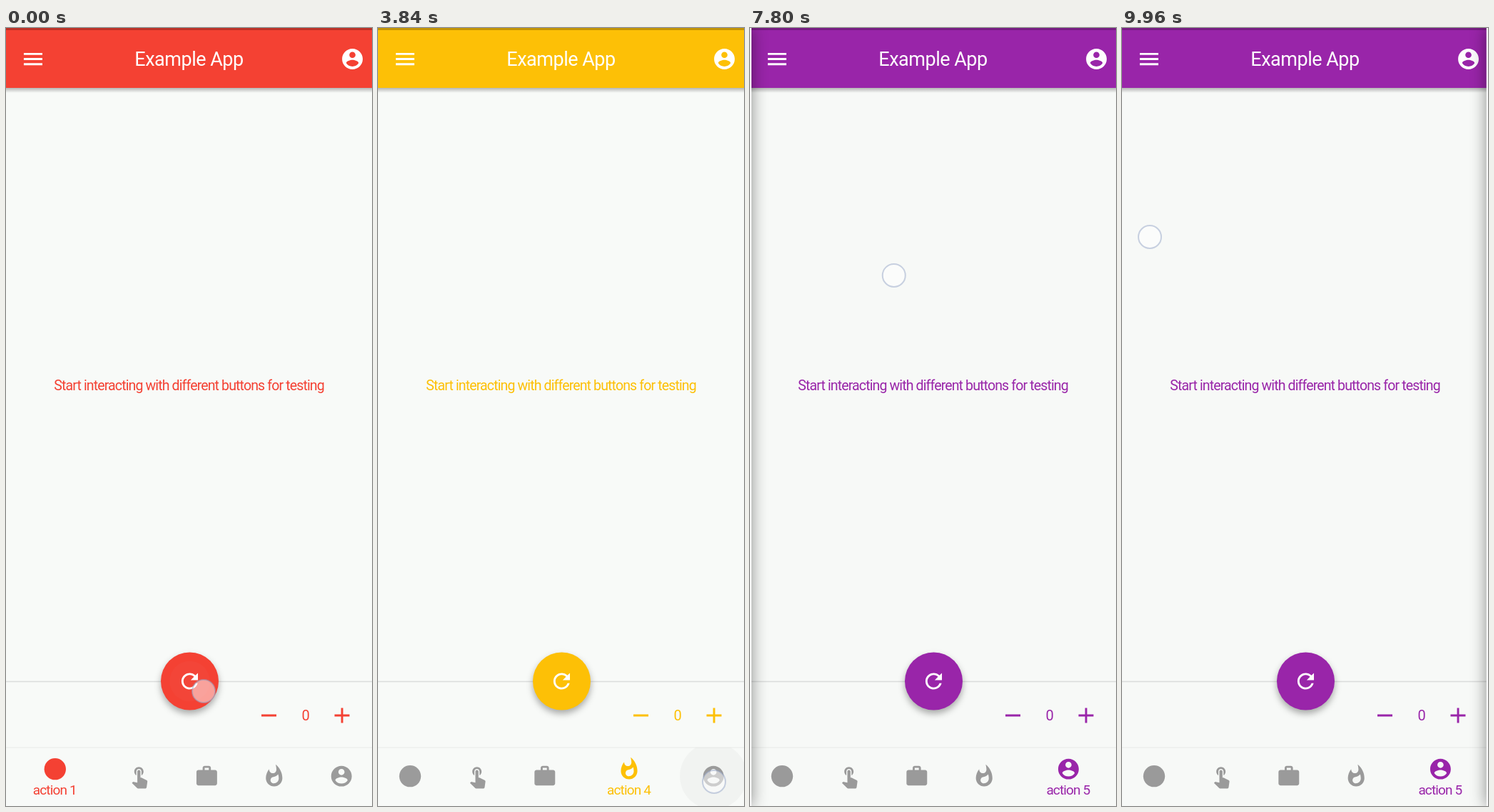
Write an HTML page that moves like this. It is 513x1091 px and loops after 10 s.

```html
<!DOCTYPE html>
<html lang="en">
<head>
<meta charset="utf-8">
<title>Example App</title>
<style>
html, body { margin: 0; width: 100%; height: 100%; overflow: hidden; background: #f8faf8; }
svg { display: block; width: 100%; height: 100%; --theme: #f44133; }
text { font-family: Roboto, "Liberation Sans", sans-serif; text-anchor: middle; }
.theme { fill: var(--theme); }
.title { font-size: 27px; letter-spacing: -.5px; fill: #fff; }
.hint { font-size: 19.5px; letter-spacing: -.86px; }
.label { font-size: 19px; letter-spacing: -.85px; }
#fab { filter: drop-shadow(0 5px 5px rgba(0, 0, 0, .32)); }
#left, #right { fill: #fafafa; filter: drop-shadow(0 0 11px rgba(0, 0, 0, .45)); }
</style>
</head>
<body>
<svg id="stage" viewBox="0 0 513 1091">
  <defs>
    <linearGradient id="under" x2="0" y2="1">
      <stop stop-color="#000" stop-opacity=".27"/>
      <stop offset="1" stop-color="#000" stop-opacity="0"/>
    </linearGradient>
    <clipPath id="fabClip"><circle cx="257.5" cy="916" r="40.5"/></clipPath>
    <clipPath id="navClip"><rect y="1009" width="513" height="82"/></clipPath>
    <path id="menu" d="M3 18h18v-2H3v2zm0-5h18v-2H3v2zm0-7v2h18V6H3z"/>
    <path id="user" d="M12 2C6.48 2 2 6.48 2 12s4.48 10 10 10 10-4.48 10-10S17.52 2 12 2zm0 3c1.66 0 3 1.34 3 3s-1.34 3-3 3-3-1.34-3-3 1.34-3 3-3zm0 14.2c-2.5 0-4.71-1.28-6-3.22.03-1.99 4-3.08 6-3.08 1.99 0 5.97 1.09 6 3.08-1.29 1.94-3.5 3.22-6 3.22z"/>
    <path id="refresh" d="M17.65 6.35A7.958 7.958 0 0 0 12 4c-4.42 0-7.99 3.58-7.99 8s3.57 8 7.99 8c3.73 0 6.84-2.55 7.73-6h-2.08A5.99 5.99 0 0 1 12 18c-3.31 0-6-2.69-6-6s2.69-6 6-6c1.66 0 3.14.69 4.22 1.78L13 11h7V4z"/>
    <circle id="dotIcon" cx="12" cy="12" r="10.5"/>
    <path id="hand" d="M9 11.24V7.5C9 6.12 10.12 5 11.5 5S14 6.12 14 7.5v3.74c1.21-.81 2-2.18 2-3.74C16 5.01 13.99 3 11.5 3S7 5.01 7 7.5c0 1.56.79 2.93 2 3.74zm9.84 4.63l-4.54-2.26c-.17-.07-.35-.11-.54-.11H13v-6c0-.83-.67-1.5-1.5-1.5S10 6.67 10 7.5v10.74l-3.43-.72c-.08-.01-.15-.03-.24-.03-.31 0-.59.13-.79.33l-.79.8 4.94 4.94c.27.27.65.44 1.06.44h6.79c.75 0 1.33-.55 1.44-1.28l.75-5.27c.01-.07.02-.14.02-.2 0-.62-.38-1.16-.91-1.38z"/>
    <path id="case" d="M20 6h-4V4c0-1.11-.89-2-2-2h-4c-1.11 0-2 .89-2 2v2H4c-1.11 0-1.99.89-1.99 2L2 19c0 1.11.89 2 2 2h16c1.11 0 2-.89 2-2V8c0-1.11-.89-2-2-2zm-6 0h-4V4h4v2z"/>
    <path id="flame" d="M13.5.67s.74 2.65.74 4.8c0 2.06-1.35 3.73-3.41 3.73-2.07 0-3.63-1.67-3.63-3.73l.03-.36C5.21 7.51 4 10.62 4 14c0 4.42 3.58 8 8 8s8-3.58 8-8C20 8.61 17.41 3.8 13.5.67zM11.71 19c-1.78 0-3.22-1.4-3.22-3.14 0-1.62 1.05-2.76 2.81-3.12 1.77-.36 3.6-1.21 4.62-2.58.39 1.29.59 2.65.59 4.04 0 2.65-2.15 4.8-4.8 4.8z"/>
  </defs>

  <rect width="513" height="1091" fill="#f8faf8"/>
  <text class="theme hint" x="256.5" y="507.5">Start interacting with different buttons for testing</text>

  <rect y="84" width="513" height="7" fill="url(#under)"/>
  <rect class="theme" width="513" height="84"/>
  <rect width="513" height="3" fill="#000" opacity=".23"/>
  <text class="title" x="256.5" y="53">Example App</text>
  <g fill="#fff">
    <use href="#menu" transform="translate(20.6 26.2) scale(1.446)"/>
    <use href="#user" transform="translate(468.2 26.2) scale(1.446)"/>
  </g>

  <rect y="915.7" width="513" height="1.6" fill="#dcdedd"/>
  <g id="stepRipples"></g>
  <path class="theme" d="M358 962.6h21v2.9h-21zM460.5 962.6h21v2.9h-21zM469.6 953.6h2.9v21h-2.9z"/>
  <text class="theme" id="count" x="420" y="971" font-size="20">0</text>

  <circle class="theme" id="fab" cx="257.5" cy="916" r="40.5"/>
  <g id="fabRipples" clip-path="url(#fabClip)"></g>
  <use href="#refresh" fill="#fff" transform="translate(240.1 898.6) scale(1.446)"/>

  <rect y="1008" width="513" height="2" fill="#f0f2f0"/>
  <rect y="1010" width="513" height="81" fill="#f8faf8"/>
  <g id="navRipples" clip-path="url(#navClip)"></g>
  <g id="tabs"></g>

  <rect id="scrim" width="513" height="1091"/>
  <rect id="left" x="-440" width="440" height="1091"/>
  <rect id="right" x="513" width="440" height="1091"/>
  <circle id="finger" r="16" fill="#fff" fill-opacity=".5" stroke="#96a5c8" stroke-opacity=".5" stroke-width="2"/>
</svg>
<script>
const LOOP = 10000, FADE = 200, GREY = '#9b9b9b', START = '#f44133';
const $ = id => document.getElementById(id);

// release time, control, theme colour afterwards
const taps = [
  [100, 'fab', '#2196f3'], [1440, 'fab', '#00bcd4'], [1700, 'fab', '#4caf50'], [1940, 'fab', '#3f51b5'],
  [2440, 'tab2', '#e91e63'], [2900, 'tab3', '#009688'], [3480, 'tab4', '#fdc006'], [3900, 'tab5', '#ff5722'],
  [4680, '+', '#8bc34a'], [4800, '+', '#03a9f4'], [4960, '+', '#cddc39'], [5120, '+', '#795548'],
  [5280, '+', '#f44133'], [5440, '+', '#ff9800'], [5680, '+', '#607d8b'],
  [6340, '-', '#4caf50'], [6480, '-', '#e91e63'], [6640, '-', '#00bcd4'], [6800, '-', '#ff5722'],
  [6960, '-', '#673ab7'], [7120, '-', '#2196f3'], [7320, '-', '#9a25aa']
].map(([up, on, color]) => ({ up, on, color, down: up - (on === 'fab' || on.startsWith('tab') ? 110 : 90) }));

// ripple centre, touch point, layer, reach, tint
const spots = {
  fab: [257.5, 916, 277, 930, 'fabRipples', 42, 'rgba(205,205,205,.18)'],
  '+': [471, 963, 497, 981, 'stepRipples', 49.5, 'rgba(0,0,0,.05)'],
  '-': [368.5, 963, 362, 972, 'stepRipples', 49.5, 'rgba(0,0,0,.05)']
};
[187.5, 281, 375.5, 470].forEach((x, i) => {
  spots['tab' + (i + 2)] = [x, 1049, x + 1, 1057, 'navRipples', 50, 'rgba(0,0,0,.04)'];
});

const drags = [
  { down: 7720, up: 7860, from: [60, 351], to: [305, 344] },
  { down: 9880, up: LOOP, from: [39, 293], to: [39, 293] }
];
const touches = taps.map(({ down, up, on }) => {
  const p = spots[on].slice(2, 4);
  return { down, up, from: p, to: p };
}).concat(drags);

const clamp = v => Math.max(0, Math.min(1, v));
const lerp = (a, b, k) => a + (b - a) * k;
const ease = k => k < .5 ? 2 * k * k : 1 - 2 * (1 - k) ** 2;
const ramp = (t, a, b) => ease(clamp((t - a) / (b - a)));
const rgb = hex => [1, 3, 5].map(i => parseInt(hex.slice(i, i + 2), 16));
const mix = (a, b, k) => a.map((v, i) => lerp(v, b[i], k));
const css = c => `rgb(${c.map(Math.round)})`;

function make(tag, attrs, parent) {
  const el = document.createElementNS('http://www.w3.org/2000/svg', tag);
  for (const key in attrs) el.setAttribute(key, attrs[key]);
  return parent.appendChild(el);
}

for (const tap of taps) {
  const [cx, cy, , , layer, reach, fill] = spots[tap.on];
  tap.reach = reach;
  tap.ripple = make('circle', { cx, cy, fill }, $(layer));
}

const tabs = ['dotIcon', 'hand', 'case', 'flame', 'user'].map((name, i) => {
  const icon = make('use', { href: '#' + name }, $('tabs'));
  const label = make('text', { class: 'theme label', y: 1075 }, $('tabs'));
  label.textContent = 'action ' + (i + 1);
  return { icon, label };
});

function themeAt(t) {
  let color = rgb(START);
  taps.forEach((tap, i) => {
    if (t < tap.up) return;
    const end = i + 1 < taps.length ? Math.min(t, taps[i + 1].up) : t;
    color = mix(color, rgb(tap.color), clamp((end - tap.up) / FADE));
  });
  return color;
}

function drawTabs(t, theme) {
  let weights = [1, 0, 0, 0, 0];
  for (const { up, on } of taps) {
    if (!on.startsWith('tab') || t < up) continue;
    const k = ramp(t, up, up + FADE);
    weights = weights.map((w, i) => lerp(w, +(i === on[3] - 1), k));
  }
  let x = -2.2;
  tabs.forEach(({ icon, label }, i) => {
    const w = weights[i], width = 94.4 + 47.6 * w, mid = x + width / 2;
    icon.setAttribute('transform', `translate(${mid - 17.35} ${1031.8 - 10 * w}) scale(1.446)`);
    icon.setAttribute('fill', css(mix(rgb(GREY), theme, w)));
    label.setAttribute('x', mid - .5);
    label.setAttribute('opacity', w);
    x += width;
  });
}

function drawRipples(t) {
  for (const { down, up, reach, ripple } of taps) {
    const alpha = t < down ? 0 : clamp((t - down) / 70) * (1 - clamp((t - up) / 250));
    ripple.setAttribute('opacity', alpha);
    ripple.setAttribute('r', reach * (.6 + .4 * clamp((t - down) / 60)));
  }
}

function drawDrawers(t) {
  const left = ramp(t, 7785, 8120) - ramp(t, 8320, 8700);
  const right = ramp(t, 8880, 9280) - ramp(t, 9600, 9980);
  const place = (el, open, dir) => {
    el.setAttribute('transform', `translate(${440 * open * dir} 0)`);
    el.setAttribute('visibility', open > 0 ? 'visible' : 'hidden');
  };
  place($('left'), left, 1);
  place($('right'), right, -1);
  $('scrim').setAttribute('opacity', .54 * Math.max(left, right));
}

function drawFinger(t) {
  const touch = touches.find(p => t >= p.down && t < p.up);
  $('finger').setAttribute('visibility', touch ? 'visible' : 'hidden');
  if (!touch) return;
  const [x, y] = mix(touch.from, touch.to, (t - touch.down) / (touch.up - touch.down));
  $('finger').setAttribute('transform', `translate(${x} ${y})`);
}

function draw(t) {
  const theme = themeAt(t);
  $('stage').style.setProperty('--theme', css(theme));
  $('count').textContent = taps.reduce((n, { up, on }) =>
    t < up ? n : n + (on === '+') - (on === '-'), 0);
  drawTabs(t, theme);
  drawRipples(t);
  drawDrawers(t);
  drawFinger(t);
}

const begin = performance.now();
function tick() {
  draw((performance.now() - begin) % LOOP);
  requestAnimationFrame(tick);
}
tick();
</script>
</body>
</html>
```
